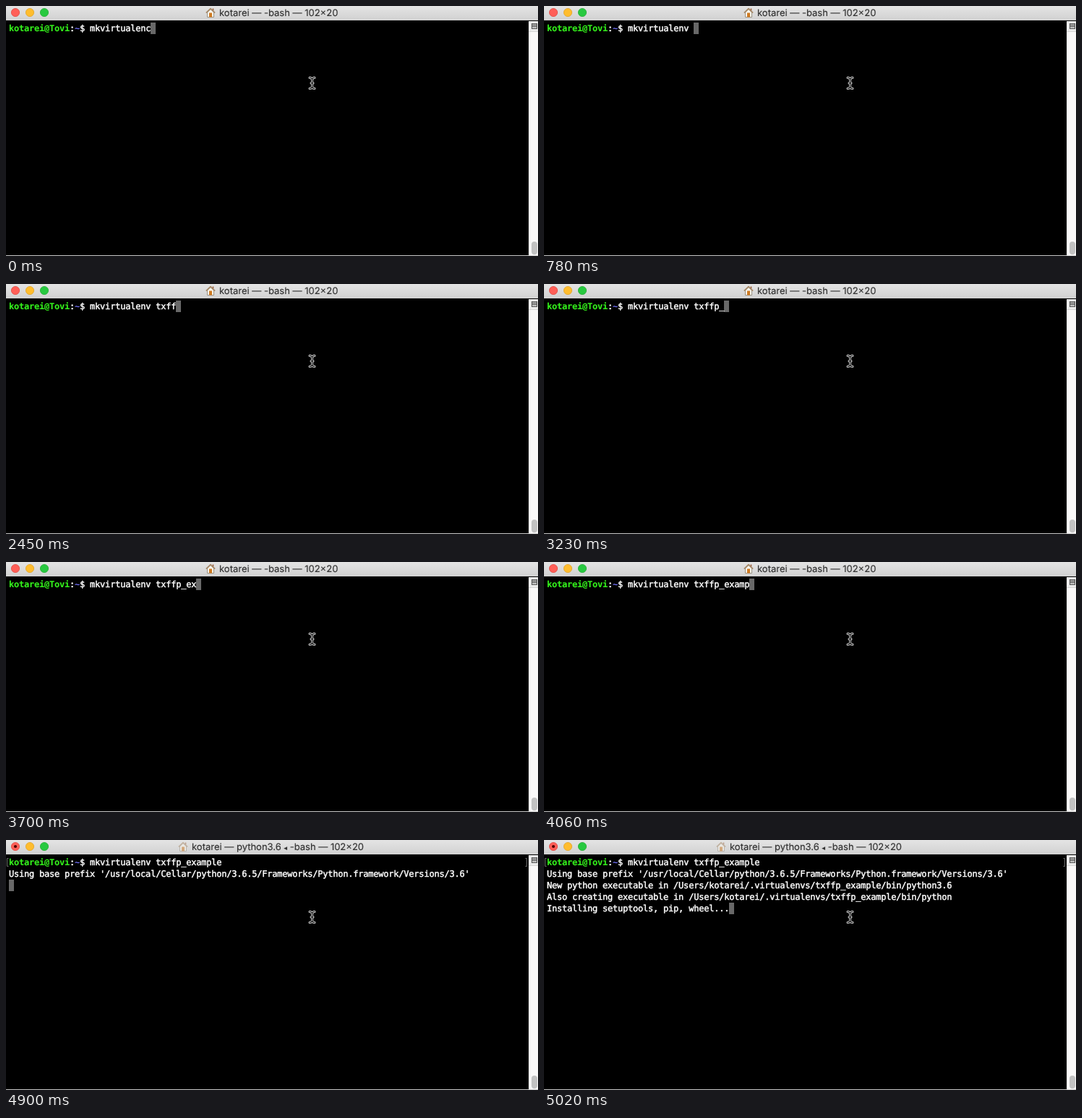
Recreate the animation shown at these times as an HTML page. Size 736x347 px, loop 8000 ms.

```html
<!DOCTYPE html>
<html lang="en">
<head>
<meta charset="utf-8">
<title>Terminal</title>
<style>
html, body { margin: 0; width: 100%; height: 100%; overflow: hidden; background: #000; }
svg { display: block; width: 736px; height: 347px; }
text { white-space: pre; text-rendering: geometricPrecision; }
.term { font: 12px "DejaVu Sans Mono", monospace; letter-spacing: -.22px; fill: #fff; stroke: #fff; stroke-width: .45px; }
.term .user { font-weight: bold; fill: #34f01c; stroke: #34f01c; stroke-width: .15px; }
.term .path { font-weight: bold; fill: #7070f8; stroke: none; }
.title { font: 13px Inter, "Open Sans", sans-serif; fill: #333; stroke: #333; stroke-width: .15px; }
.title .arrow { font: 9px "DejaVu Sans", sans-serif; }
</style>
</head>
<body>
<svg viewBox="0 0 736 347" xmlns="http://www.w3.org/2000/svg">
  <defs>
    <linearGradient id="bar" x2="0" y2="1">
      <stop offset="0" stop-color="#e4e4e4"/>
      <stop offset="1" stop-color="#d1d1d1"/>
    </linearGradient>
  </defs>
  <rect width="736" height="347" fill="#000"/>

  <!-- title bar -->
  <rect width="736" height="20" fill="url(#bar)"/>
  <g stroke-width=".8">
    <circle cx="13" cy="9" r="5.6" fill="#ff5f57" stroke="#e2463f"/>
    <circle cx="33" cy="9" r="5.6" fill="#ffbd2e" stroke="#e1a325"/>
    <circle cx="53" cy="9" r="5.6" fill="#28c940" stroke="#1fae30"/>
  </g>
  <circle id="busy" cx="13" cy="9" r="2.1" fill="#4d0000"/>
  <g id="home">
    <path d="M2.5 8.5V15H11.5V8.5L7 4Z" fill="#faf6ec" stroke="#8f887c" stroke-width=".9"/>
    <path d="M10.5 3V6" stroke="#9c5f3c" stroke-width="1.6"/>
    <path d="M.8 9L7 3L13.2 9" fill="none" stroke="#a58460" stroke-width="1.6" stroke-linejoin="round"/>
    <rect x="5" y="9" width="4" height="6" fill="#cf7a22"/>
  </g>
  <text id="title" class="title" y="14"></text>

  <!-- scroll bar -->
  <rect x="723" y="21" width="13" height="326" fill="#faf9f9"/>
  <rect x="723" y="21" width="1" height="326" fill="#ececec"/>
  <rect x="724" y="21" width="12" height="15" fill="#ececec"/>
  <rect x="723" y="35" width="13" height="1" fill="#d4d4d4"/>
  <rect x="727.5" y="24.5" width="7" height="7" fill="#c4c4c4" stroke="#555"/>
  <path d="M728 26.5H734M728 28.5H734" stroke="#555"/>
  <rect x="727" y="327" width="8" height="18" rx="4" fill="#c2c2c2"/>
  <rect y="346" width="736" height="1" fill="#c8c8c8"/>

  <!-- terminal -->
  <rect id="caret" width="7" height="16" fill="#686868"/>
  <path id="marks" d="M3.5 25.5H1.5V36.5H3.5M718.5 25.5H720.5V36.5H718.5" fill="none" stroke="#6c6c6c"/>
  <g id="rows"></g>

  <!-- pointer -->
  <g fill="none" stroke-linecap="round" transform="translate(-.5 0)">
    <path id="beam" d="M420.5 99.5Q424 99.5 424 102.5V111.5Q424 114.5 420.5 114.5M427.5 99.5Q424 99.5 424 102.5M424 111.5Q424 114.5 427.5 114.5M422.5 107H425.5" stroke="#d8d8d8" stroke-width="3"/>
    <use href="#beam" id="core"/>
  </g>
</svg>
<script>
const LOOP = 8000, CELL = 7, ROW = 16, LEFT = 4, TOP = 23;
const USER = 'kotarei', HOST = 'Tovi';
const START = 'mkvirtualenc', PROMPT = `${USER}@${HOST}:~$ `;
const ENTER = 4780, RUN = 4900, DONE = 5020;

// Key presses; '<' is backspace.
const keys = '<v txffp_example';
const times = [480, 600, 780, 1920, 2100, 2270, 2450, 2570, 3230, 3460,
  3700, 3820, 3940, 4060, 4240, 4420];

const env = `/Users/${USER}/.virtualenvs/txffp_example/bin/python`;
const output = [
  [RUN, "Using base prefix '/usr/local/Cellar/python/3.6.5/Frameworks/Python.framework/Versions/3.6'"],
  [DONE, `New python executable in ${env}3.6`],
  [DONE, `Also creating executable in ${env}`],
  [DONE, 'Installing setuptools, pip, wheel...']
];

const NS = 'http://www.w3.org/2000/svg';
const $ = id => document.getElementById(id);
const show = (el, on) => el.setAttribute('visibility', on ? 'visible' : 'hidden');

// The pointer's dark core is the same outline with a thinner stroke.
const core = $('beam').cloneNode();
core.removeAttribute('id');
core.setAttribute('stroke', '#000');
core.setAttribute('stroke-width', '1.1');
$('core').replaceWith(core);

function add(parent, tag, attrs, text = '') {
  const el = document.createElementNS(NS, tag);
  for (const k in attrs) el.setAttribute(k, attrs[k]);
  el.textContent = text;
  return parent.appendChild(el);
}

const addRow = (i, text) =>
  add($('rows'), 'text', { class: 'term', x: LEFT, y: TOP + ROW * i + 12 }, text);

const first = addRow(0);
add(first, 'tspan', { class: 'user' }, `${USER}@${HOST}`);
add(first, 'tspan', {}, ':');
add(first, 'tspan', { class: 'path' }, '~');
add(first, 'tspan', {}, '$ ');
const command = add(first, 'tspan', {});
const lines = output.map(([, text], i) => addRow(i + 1, text));

function typed(t) {
  let s = START;
  times.forEach((at, i) => {
    if (t >= at) s = keys[i] === '<' ? s.slice(0, -1) : s + keys[i];
  });
  return s;
}

function setTitle(running) {
  const job = running ? 'python3.6 <tspan class="arrow">◂</tspan> -bash' : '-bash';
  const x = running ? 257 : 295;
  $('title').setAttribute('x', x);
  $('title').innerHTML = `${USER} — ${job} — 102×20`;
  $('home').setAttribute('transform', `translate(${x - 19} .5)`);
  $('home').setAttribute('opacity', running ? .5 : 1);
  show($('busy'), running);
}

let wasRunning = null;

function draw(t) {
  const text = typed(t), running = t >= RUN;
  command.textContent = text;
  show($('marks'), t >= ENTER);
  let row = 0, col = PROMPT.length + text.length;
  if (t >= ENTER) { row = 1; col = 0; }
  output.forEach(([at, line], i) => {
    show(lines[i], t >= at);
    if (t < at) return;
    const last = i === output.length - 1;
    row = last ? i + 1 : i + 2;
    col = last ? line.length : 0;
  });
  $('caret').setAttribute('x', LEFT + CELL * col);
  $('caret').setAttribute('y', TOP + ROW * row);
  if (running !== wasRunning) setTitle(wasRunning = running);
}

const origin = performance.now();
function tick() {
  draw((performance.now() - origin) % LOOP);
  requestAnimationFrame(tick);
}
tick();
</script>
</body>
</html>
```
